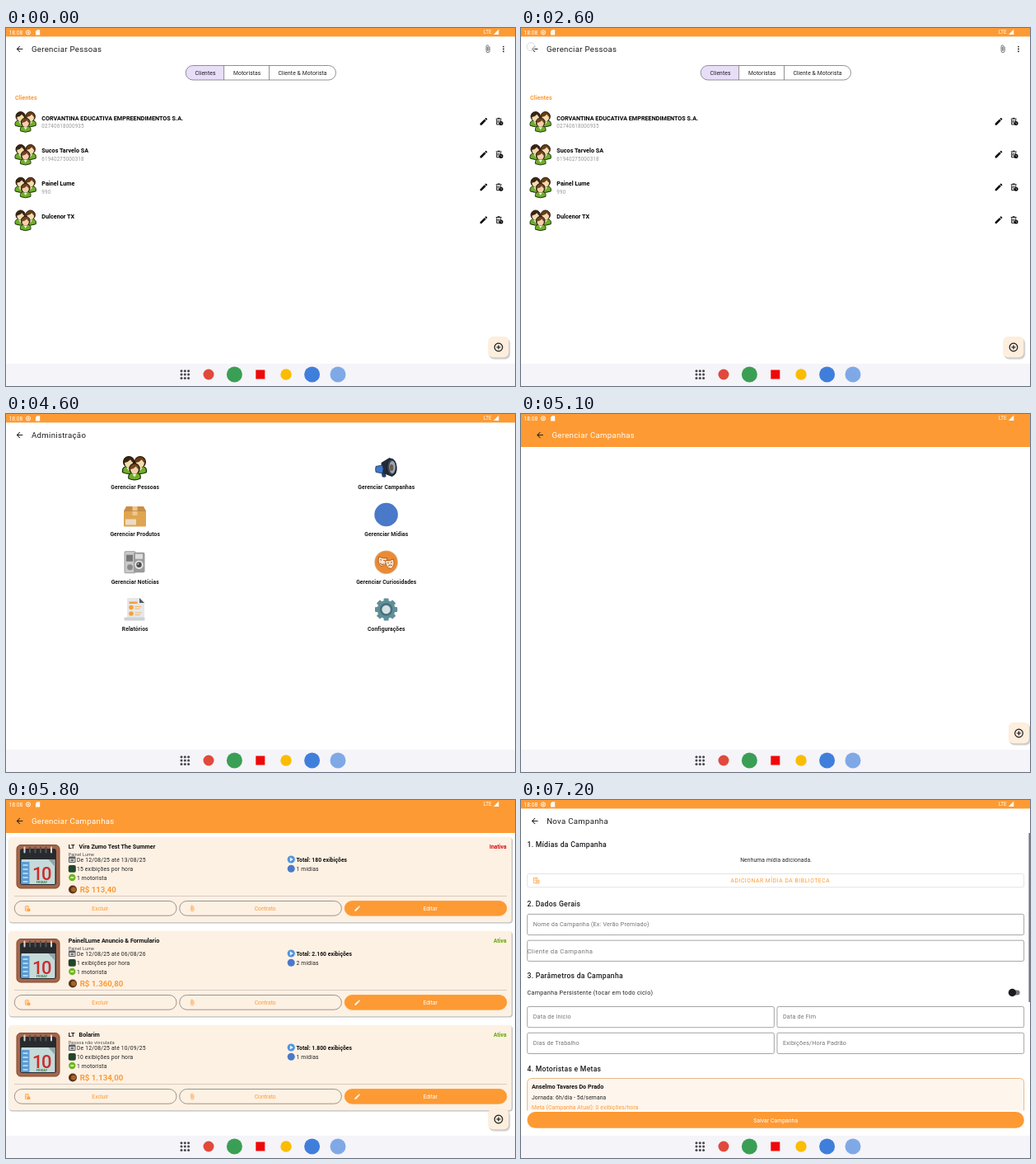
These frames come from a looping animation (618 px wide and 434 px high, 8000 ms). An HTML page:

```html
<!DOCTYPE html>
<html lang="pt">
<head>
<meta charset="utf-8">
<title>Painel de campanhas</title>
<style>
html, body { margin: 0; width: 100%; height: 100%; overflow: hidden; background: #fff; }
svg { display: block; width: 618px; height: 434px; }
text { font-family: Roboto, sans-serif; white-space: pre; }
</style>
</head>
<body>
<svg id="stage" viewBox="0 0 618 434" xmlns="http://www.w3.org/2000/svg"></svg>
<script>
const ORANGE = '#fd9a33', INK = '#1c1b1f', CREAM = '#fdf1e4';
const SLIDE = 62, LOOP = 8000, STEP = 100;

// ---------- drawing helpers ----------
const attrs = o => Object.entries(o).map(([k, v]) => ` ${k}="${v}"`).join('');
const rect = (x, y, width, height, fill, o = {}) =>
  `<rect${attrs({ x, y, width, height, fill, ...o })}/>`;
const circle = (cx, cy, r, fill, o = {}) => `<circle${attrs({ cx, cy, r, fill, ...o })}/>`;
const oval = (cx, cy, rx, ry, fill, o = {}) => `<ellipse${attrs({ cx, cy, rx, ry, fill, ...o })}/>`;
const path = (d, fill, o = {}) => `<path${attrs({ d, fill, ...o })}/>`;
const line = (d, stroke, w, o = {}) => path(d, 'none', { stroke, 'stroke-width': w, ...o });
const group = (x, y, s, body) => `<g transform="translate(${x} ${y}) scale(${s})">${body}</g>`;
const times = (n, f) => Array.from({ length: n }, (_, i) => f(i)).join('');

function text(x, y, str, size, fill = INK, { ls = 0, w = 400, a = 'start' } = {}) {
  const safe = str.replace(/&/g, '&amp;');
  return `<text${attrs({ x, y, fill, 'font-size': size, 'letter-spacing': ls,
    'font-weight': w, 'text-anchor': a })}>${safe}</text>`;
}
const bold = (x, y, str, size, fill, o = {}) => text(x, y, str, size, fill, { w: 700, ...o });

// ---------- line icons on a 24 unit grid, placed by centre ----------
const icons = {
  back: c => path('M20 11v2H8l5.5 5.5-1.42 1.42L4.16 12l7.92-7.92L13.5 5.5 8 11z', c),
  pencil: c => path('M20.7 7c.4-.4.4-1 0-1.4l-2.3-2.3c-.4-.4-1-.4-1.4 0l-1.9 1.8 3.8 3.8zM3 17.2V21h3.8L17.8 9.9l-3.7-3.7z', c),
  bin: (c, hole) => line('M3.5 5h15M8 3.4h6M5.5 7v13h7M16.5 7v4M9 9v7M13 9v3', c, 2) +
    circle(17, 17, 5.5, c) + line('M17 14v3.4l2.3 1.3', hole, 1.4),
  clip: c => line('M17 6v11.5a4.7 4.7 0 0 1-9.4 0V5a3.2 3.2 0 0 1 6.4 0v10.5a1.7 1.7 0 0 1-3.4 0V6', c, 1.8),
  plus: c => circle(12, 12, 9.3, 'none', { stroke: c, 'stroke-width': 2.2 }) +
    line('M12 7v10M7 12h10', c, 2.2),
  dots: c => times(3, i => circle(12, 6 + 6 * i, 2, c)),
  library: c => line('M4 4h11v5M4 4v15h7M7 8h6M7 12h3', c, 1.8) +
    line('M12 11h8v9h-8z', c, 1.8) + path('M14.5 13l4 2.5-4 2.5z', c)
};
const icon = (name, cx, cy, c = '#111', size = 11.6, hole = '#fff') =>
  group(cx - size / 2, cy - size / 2, size / 24, icons[name](c, hole));

// ---------- pictograms, centred on 0,0 ----------
function person(x, y, hair, skin, s) {
  return group(x, y, s,
    path('M-6.5 10c-1-5 2-6.500 6.500-6.500s7.500 1.500 6.500 6.500q-6.500 3-13 0z', '#6fae2a',
      { stroke: '#1d3009', 'stroke-width': 1 }) +
    path('M-2.500 4.500l2.500 4 2.500-4z', '#eef7dc') +
    circle(0, -1, 5.7, hair, { stroke: '#24170a', 'stroke-width': 1 }) +
    path('M-4.300-.3q4-.7 6-3.200 1 2 2.600 3.200c0 3.200-1.800 5.300-4.300 5.300s-4.300-2.100-4.300-5.300z', skin));
}
const people = (x, y, s) => group(x, y, s,
  person(-6, -5, '#3b2512', '#f3dcae', 1) + person(6, -5, '#6b3d17', '#f3dcae', 1) +
  person(0, 2, '#70451f', '#f6cfae', .95));

const megaphone = (x, y) => group(x, y, 1,
  path('M-6 5l5 1 1 5q-3 1.500-5 0z', '#27406f') +
  path('M-6-6L4-12q8 2 9 11T7 11L-6 6z', '#232b38') +
  path('M-12.500-1.500q-1 3.500 0 7l8 1.500q2-5 0-10z', '#3f78c8', { stroke: '#1f3157', 'stroke-width': .8 }) +
  oval(6.500, -.5, 5.5, 10, '#3a4453', { stroke: '#171d27' }) +
  oval(7.500, -.5, 3.8, 7.5, '#9aa4b2') + oval(6.500, 0, 2.2, 4, '#6f5a4a'));

const box = (x, y) => group(x, y + .5, 1,
  path('M-10.500-11.500h21l3 5.500h-27z', '#c98f45') + rect(-13.5, -6, 27, 19, '#dfa550', { rx: 1 }) +
  rect(-3, -11.5, 6, 11, '#eec88c') + rect(-11.5, 4, 13, 7, '#e9dcc6') +
  line('M-13.500-6h27', '#b67a34', .7));

const news = (x, y) => group(x, y, 1,
  rect(-12.5, -13, 13, 26, '#c9c9c9', { rx: 1, stroke: '#8d8d8d', 'stroke-width': .8 }) +
  rect(-10.5, -9, 8, 8, '#777') + circle(-6, 6, 3.5, '#8a8a8a') +
  rect(-1.5, -12, 13.5, 24.5, '#9b9b9b', { rx: 2 }) + rect(.5, -10, 9, 6, '#dedede') +
  circle(5, 3, 5.3, '#e2e2e2') + circle(5, 3, 3.2, '#4a4a4a') + circle(4, 2, 1, '#ccc'));

const mask = (x, y, rot, mouth) => `<g transform="translate(${x} ${y}) rotate(${rot})">` +
  path('M-5-4q5 2 10 0 1 9-5 11-6-2-5-11z', '#fbe3cd', { stroke: '#a95513', 'stroke-width': .8 }) +
  line(`M-3-.5h2M1-.5h2M-2.500 3.500q2.500 ${mouth} 5 0`, '#a95513', 1) + '</g>';
const theatre = (x, y) => circle(x, y, 14.3, '#d8b48f') + circle(x, y, 13.5, '#ea8a34') +
  mask(x - 4.5, y - 2, 10, 2.5) + mask(x + 4.5, y + 1, -10, -2.5);

const report = (x, y) => group(x, y, 1,
  path('M-9.500-14H5.500l6 6v18h-21z', '#e6e7e9') + path('M5.500-14v6h6z', '#55595f') +
  rect(-7, -9.5, 10, 2.5, '#f0a040') +
  [-2.5, 5].map(v => circle(-4.5, v, 2.8, '#f2a23b') + line(`M0 ${v - 1}h8M0 ${v + 1.5}h6`, '#f0b76a', 1.2)).join('') +
  rect(-13, 9.5, 25, 4, '#cfd2d6', { rx: 1 }));

const gear = (x, y) => group(x, y, 1,
  times(8, i => `<g transform="rotate(${i * 45})">${rect(-3, -13.6, 6, 6, '#5f8f99', { rx: 1 })}</g>`) +
  circle(0, 0, 11, '#5f8f99') + circle(0, 0, 7.8, '#4a6f7b') + circle(0, 0, 5.2, '#d3e2e5'));

const calendar = (x, y) => group(x, y, 1,
  rect(.5, .5, 52, 52.5, '#a5664a', { rx: 5, stroke: '#81492f' }) +
  rect(4.500, 5, 44, 44, '#282b2e', { rx: 3 }) +
  rect(6, 18, 41, 30, '#c6dada', { rx: 1 }) + path('M39 18h8v9z', '#8fa6a8') +
  rect(6, 21, 10, 27, '#5b9bd3') +
  times(5, i => line(`M8 ${25 + i * 5}h6`, '#d9ecfa', 1.4)) +
  times(6, i => rect(9 + i * 6.5, 2.5, 2, 8, i % 5 ? '#50555a' : '#d5d8da', { rx: 1 })) +
  text(30.5, 42.5, '10', 22, '#cc2b28', { w: 500, ls: -1.5, a: 'middle' }) +
  text(31, 47.3, 'FRIDAY', 4, '#3f7a4a', { w: 700, a: 'middle' }));

// ---------- shared parts ----------
const page = () => rect(-70, 0, 760, 434, '#fff');
const header = (title, ink = INK) =>
  icon('back', 16.5, 25.5, '#222') + text(31, 29, title, 9.66, ink, { ls: .28 });
const fab = () =>
  times(4, i => rect(585.5 + i * .5, 374.5 + i * .7, 25.5, 25.5, '#000', { rx: 6, opacity: .07 })) +
  rect(585.5, 374, 25, 25.5, '#fdeedd', { rx: 6 }) + icon('plus', 598, 387, '#111', 12.5);

// ---------- screens ----------
function listScreen() {
  const rows = [
    ['CORVANTINA EDUCATIVA EMPREENDIMENTOS S.A.', '02740618000935'],
    ['Sucos Tarvelo SA', '61940275000318'],
    ['Painel Lume', '990'],
    ['Dulcenor TX', '']
  ];
  const tab = (x, s) => text(x, 57, s, 6.76, INK, { ls: .1, a: 'middle' });
  return page() + header('Gerenciar Pessoas') +
    icon('clip', 585, 25.3, '#555', 10.5) + icon('dots', 604, 25.5, '#333') +
    path('M264.600 45.500H227.200a8.750 8.750 0 0 0 0 17.500H264.600z', '#e8def8') +
    rect(218.2, 45.5, 182.3, 17.5, 'none', { rx: 8.75, stroke: '#79747e', 'stroke-width': .8 }) +
    line('M264.600 45.500v17.500M319.500 45.500v17.500', '#79747e', .8) +
    tab(242, 'Clientes') + tab(292.7, 'Motoristas') + tab(360, 'Cliente & Motorista') +
    bold(11, 87.3, 'Clientes', 7.24, ORANGE) +
    rows.map(([name, id], i) => {
      const y = 113.3 + i * 39.8;
      return people(23.7, y, 1) + bold(43.3, y - 1.7, name, 7.24, '#000') +
        text(43.3, y + 8, id, 6.28, '#999', { ls: .15 }) +
        icon('pencil', 580, y, '#000') + icon('bin', 598.7, y, '#000', 11);
    }).join('') + fab();
}

function adminScreen() {
  const label = (x, i, s) => bold(x, 91 + i * 57.3, s, 6.76, INK, { ls: .1, a: 'middle' });
  const L = 156.5, R = 461.6;
  return page() + header('Administração') +
    people(L - .5, 65, 1.15) + megaphone(R, 65) +
    box(L, 123) + circle(R, 122, 14.3, '#4a79c9') +
    news(L, 179.7) + theatre(R, 179.7) + report(L, 237) + gear(R, 237) +
    ['Gerenciar Pessoas', 'Gerenciar Produtos', 'Gerenciar Notícias', 'Relatórios']
      .map((s, i) => label(L + .2, i, s)).join('') +
    ['Gerenciar Campanhas', 'Gerenciar Mídias', 'Gerenciar Curiosidades', 'Configurações']
      .map((s, i) => label(R + .2, i, s)).join('');
}

function card(i, c) {
  const info = (x, y, s) => text(x, y, s, 6.76, '#222', { ls: .19 });
  const button = (x, s, name) => {
    const full = name === 'pencil', ink = full ? '#fff' : ORANGE;
    return rect(x, 122.5, 196.7, 17.7, full ? ORANGE : 'none',
      { rx: 8.85, stroke: full ? ORANGE : '#857d75', 'stroke-width': .8 }) +
      icon(name, x + 15.5, 131.5, ink, 8.5, CREAM) +
      text(x + 104, 133.8, s, 6.76, ink, { a: 'middle' });
  };
  return group(0, i * 114, 1,
    rect(4, 46.5, 611.5, 103.5, '#000', { rx: 4, opacity: .1 }) +
    rect(3.5, 45.3, 611.5, 104, '#000', { rx: 4, opacity: .16 }) +
    rect(3.8, 44.8, 610, 103.4, CREAM, { rx: 3.5 }) +
    calendar(12.5, 54) + bold(75.7, 59, c.name, 7.24, '#111') +
    text(75.7, 68, c.owner, 5.31, '#444', { ls: .23 }) +
    rect(76, 68.5, 8.5, 7.5, '#5b5f63', { rx: 1 }) + rect(77, 71, 6.5, 4, '#d5d8da') +
    rect(78.5, 71.8, 3.5, 2.4, '#777') +
    rect(75.8, 79, 9, 8.8, '#23452a', { rx: 2 }) +
    circle(80.3, 94, 4.2, '#6fb522') + rect(78.3, 93.2, 4, 1.6, '#e4f5cd') +
    circle(81, 108.5, 5, '#5d3216') + circle(82, 108.5, 3, '#a5642a') +
    info(86, 75.3, c.dates) + info(86, 86.2, c.rate) + info(86, 96.8, '1 motorista') +
    circle(346.2, 72, 4.6, '#4f94dd') + path('M344.800 69.500l4 2.500-4 2.500z', '#e8f4ff') +
    circle(346.2, 83.3, 4.5, '#4a79c9') +
    bold(352.5, 75.3, c.total, 6.76, '#111', { ls: .04 }) + info(352.5, 86.2, c.media) +
    bold(89.7, 111.7, c.price, 9.66, ORANGE) +
    bold(607.7, 58.7, c.on ? 'Ativa' : 'Inativa', 6.76, c.on ? '#62a800' : '#dd0808', { a: 'end', ls: .05 }) +
    line('M10 116.500H608', '#cdc2b5', .8) +
    button(10.3, 'Excluir', 'bin') + button(210.7, 'Contrato', 'clip') + button(411.2, 'Editar', 'pencil'));
}

function campaignScreen() {
  const cards = [
    { name: 'LT   Vira Zumo Test The Summer', owner: 'Painel Lume', dates: 'De 12/08/25 até 13/08/25',
      rate: '15 exibições por hora', total: 'Total: 180 exibições', media: '1 mídias', price: 'R$ 113,40' },
    { name: 'PainelLume Anuncio & Formulario', owner: 'Painel Lume', dates: 'De 12/08/25 até 06/08/26',
      rate: '1 exibições por hora', total: 'Total: 2.160 exibições', media: '2 mídias', price: 'R$ 1.360,80', on: true },
    { name: 'LT   Bolarim', owner: 'Pessoa não vinculada', dates: 'De 12/08/25 até 10/09/25',
      rate: '10 exibições por hora', total: 'Total: 1.800 exibições', media: '1 mídias', price: 'R$ 1.134,00', on: true }
  ];
  return page() + rect(-70, 0, 760, 40, ORANGE) + header('Gerenciar Campanhas', '#fff') +
    `<g id="cards">${cards.map((c, i) => card(i, c)).join('')}</g>` + fab();
}

function formScreen() {
  const head = (y, s) => text(7.3, y, s, 8.69, INK, { w: 500, ls: .24 });
  const field = (x, y, w, s) =>
    rect(x, y, w, 25.2, '#fff', { rx: 2, stroke: '#8f8f8f', 'stroke-width': .8 }) +
    text(x + 7, y + 14.7, s, 7.24, '#757575', { ls: .15 });
  return page() + header('Nova Campanha') +
    head(57, '1. Mídias da Campanha') +
    text(309.5, 74.5, 'Nenhuma mídia adicionada.', 6.76, '#222', { ls: .12, a: 'middle' }) +
    rect(7.5, 89.5, 603, 16.3, 'none', { rx: 2, stroke: '#dcdcdc', 'stroke-width': .8 }) +
    icon('library', 18.5, 97.7, ORANGE, 10) +
    text(314.7, 100.2, 'ADICIONAR MÍDIA DA BIBLIOTECA', 6.76, ORANGE, { ls: .57, a: 'middle' }) +
    head(129, '2. Dados Gerais') +
    field(7.5, 138.4, 603, 'Nome da Campanha (Ex: Verão Premiado)') +
    field(7.5, 170.2, 603, '') +
    text(7.3, 185.7, 'Cliente da Campanha', 7.72, '#757575', { ls: .34 }) +
    head(215.8, '3. Parâmetros da Campanha') +
    text(7.3, 235.6, 'Campanha Persistente (tocar em todo ciclo)', 7.24, '#222', { ls: .26 }) +
    rect(593, 230.6, 12.5, 5.8, '#77757a', { rx: 2.9 }) + circle(596.3, 233.5, 4.7, INK) +
    field(7.5, 250.5, 299.7, 'Data de Início') + field(310.8, 250.5, 299.7, 'Data de Fim') +
    field(7.5, 282.3, 299.7, 'Dias de Trabalho') + field(310.8, 282.3, 299.7, 'Exibições/Hora Padrão') +
    head(328.5, '4. Motoristas e Metas') +
    `<g clip-path="url(#scroll)"><g id="pending">${head(380.5, '5. Valores')}</g><g id="driver">` +
    rect(7.5, 337.5, 603, 60, '#fef5ec', { rx: 5, stroke: '#e3b27c', 'stroke-width': .9 }) +
    bold(12.8, 350.2, 'Anselmo Tavares Do Prado', 7.24, '#111') +
    text(12.8, 363.2, 'Jornada: 6h/dia - 5d/semana', 6.76, '#222', { ls: .12 }) +
    text(12.8, 374.6, 'Meta (Campanha Atual): 0 exibições/hora', 6.76, ORANGE, { ls: .12 }) +
    '</g></g>' + rect(616.3, 40, 1.7, 205, '#757575', { id: 'bar' }) +
    rect(7.3, 378, 603.4, 19.8, ORANGE, { rx: 9.9 }) +
    text(309, 390.5, 'Salvar Campanha', 6.76, '#fff', { ls: .08, a: 'middle' });
}

function system() {
  return rect(0, 0, 618, 10.4, ORANGE) + text(3.5, 8, '18:08', 6.76, '#fff') +
    circle(27, 5.4, 2.6, 'none', { stroke: '#fff', 'stroke-width': .9 }) +
    line('M25.500 5.400h3M27 3.800v3.200', '#fff', .7) +
    path('M37.800 2.200h3.400v6.400h-5.200V4z', '#fff') +
    text(579.8, 7.1, 'LTE', 6.3, '#fff') + path('M598.300 1.600v6.400h-6.400z', '#fff') +
    rect(0, 407, 618, 27, '#f5f4f9') +
    times(9, i => circle(213 + (i % 3) * 4.3, 415.8 + Math.floor(i / 3) * 4.3, 1.5, '#47464a')) +
    circle(246, 420, 6.5, '#e04a3c') + circle(277.4, 420, 9.5, '#3a9f55') +
    rect(303.3, 414.5, 11, 11, '#f00808') + circle(340, 420, 6.7, '#fbbc04') +
    circle(371.6, 420, 9.5, '#3f7fdb') + circle(403, 420, 9.5, '#7fa9e6');
}

// ---------- assembly ----------
const stage = document.getElementById('stage');
stage.innerHTML =
  '<defs><clipPath id="scroll"><rect x="-70" y="40" width="760" height="336.5"/></clipPath></defs>' +
  Object.entries({ admin: adminScreen, list: listScreen, campaigns: campaignScreen, form: formScreen })
    .map(([id, draw]) => `<g id="${id}">${draw()}</g>`).join('') +
  circle(0, 0, 5, '#fafafa', { id: 'ripple', 'fill-opacity': .6, stroke: '#cfcfcf', 'stroke-width': .7 }) +
  system();
const el = id => document.getElementById(id);

// ---------- motion ----------
const clamp = v => Math.max(0, Math.min(1, v));
const bez = (s, a, b, c, d) =>
  a * (1 - s) ** 3 + 3 * b * s * (1 - s) ** 2 + 3 * c * s * s * (1 - s) + d * s ** 3;

// Fast start, very slow finish: two joined curves.
function ease(x) {
  x = clamp(x);
  const [bx, by] = x < 1 / 6
    ? [[0, .05, .1333, 1 / 6], [0, 0, .06, .4]]
    : [[1 / 6, .2083, .25, 1], [.4, .82, 1, 1]];
  let lo = 0, hi = 1;
  for (let i = 0; i < 30; i++) {
    const mid = (lo + hi) / 2;
    if (bez(mid, ...bx) < x) lo = mid; else hi = mid;
  }
  return bez(lo, ...by);
}

const CLOSE = 2930, OPEN = 4934, FORM = 6817;
const move = (t, start) => ease((t - start) / 450);
const fade = (t, start, delay) => clamp((t - start - delay) / 83);
const show = (id, on) => el(id).setAttribute('display', on ? 'inline' : 'none');

function place(id, x, alpha = 1) {
  show(id, alpha > 0);
  el(id).setAttribute('transform', `translate(${x.toFixed(2)} 0)`);
  el(id).setAttribute('opacity', alpha);
}

function render(time) {
  const t = Math.floor(time / STEP) * STEP;
  const close = move(t, CLOSE), open = move(t, OPEN), form = move(t, FORM);
  place('admin', SLIDE * (close - 1 - open));
  place('list', SLIDE * close, 1 - fade(t, CLOSE, 35));
  place('campaigns', SLIDE * (1 - open - form), fade(t, OPEN, 50));
  place('form', SLIDE * (1 - form), fade(t, FORM, 50));
  show('cards', t >= 5300);
  show('driver', t >= 7100);
  show('pending', t < 7100);
  show('bar', t >= 7000);

  const k = (t - 2600) / 300;
  show('ripple', k >= 0 && t < CLOSE);
  el('ripple').setAttribute('transform', `translate(${12 + 4.5 * k} ${22.7 + 2.8 * k})`);
  el('ripple').setAttribute('r', Math.max(0, 5 + 5 * k));
}

const start = performance.now();
function tick() {
  render((performance.now() - start) % LOOP);
  requestAnimationFrame(tick);
}
tick();
</script>
</body>
</html>
```
